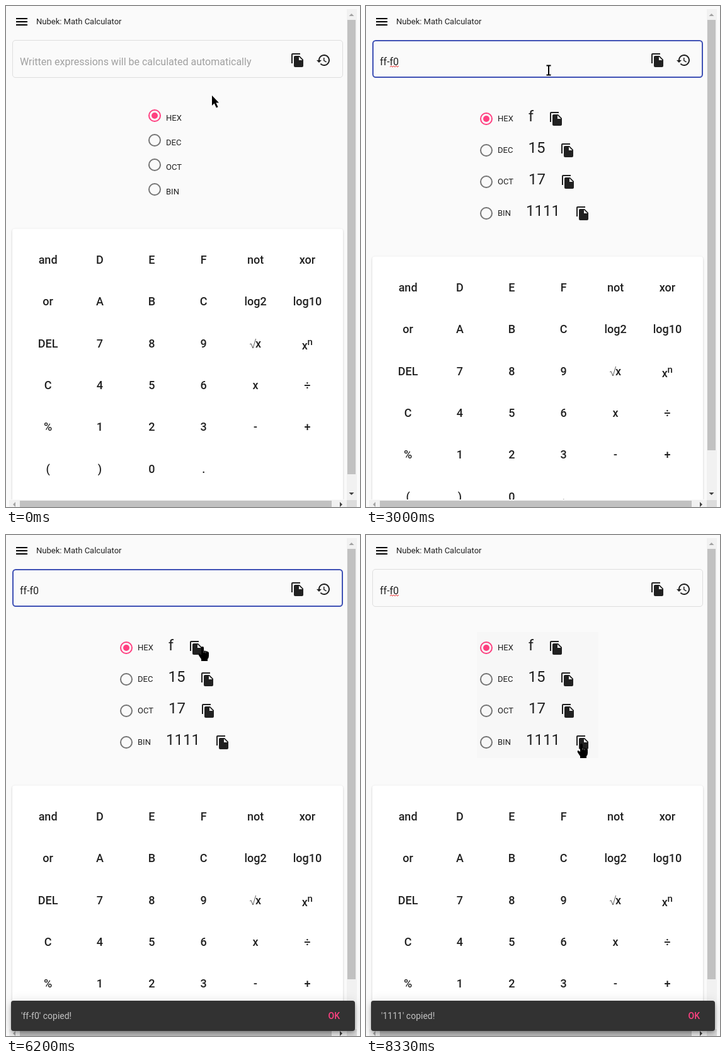
An HTML page for the animation above (9.14 s loop, 562 px wide and 795 px high).

```html
<!DOCTYPE html>
<html lang="en">
<head>
<meta charset="utf-8">
<title>Math Calculator</title>
<style>
  html, body { margin: 0; width: 100%; height: 100%; overflow: hidden; background: #fafafa; }
  #stage { position: relative; width: 562px; height: 795px; overflow: hidden; font-family: Roboto, sans-serif; }
  svg { position: absolute; left: 0; top: 0; }
  text { fill: #212121; white-space: pre; }
  .label { font-size: 13px; }
  .value { font-size: 24px; }
  .input { font-size: 16px; }
  .key { font-size: 18px; font-weight: 500; text-anchor: middle; }
  .card { fill: #fff; filter: drop-shadow(0 1px 1.5px rgba(0,0,0,.2)); }
  .track { fill: #f1f1f1; }
  .thumb { fill: #c1c1c1; }
  #snack {
    position: absolute; left: 8px; top: 739px; width: 546px; height: 48px; box-sizing: border-box;
    padding: 0 24px 0 16px; display: flex; align-items: center; justify-content: space-between;
    border-radius: 4px; background: #323232; color: rgba(255,255,255,.7); font-size: 14px; line-height: 20px;
    box-shadow: 0 3px 5px -1px rgba(0,0,0,.2), 0 6px 10px rgba(0,0,0,.14), 0 1px 18px rgba(0,0,0,.12);
  }
  #snack b { font-weight: 500; color: #ff4081; }
</style>
</head>
<body>
<div id="stage">
  <svg width="562" height="795">
    <defs>
      <path id="copy" fill="#212121" d="M16 1H4c-1.1 0-2 .9-2 2v14h2V3h12V1zm-1 4l6 6v10c0 1.1-.9 2-2 2H7.99C6.89 23 6 22.1 6 21l.01-14c0-1.1.89-2 1.99-2h7zm-1 7h5.5L14 6.5V12z"/>
      <clipPath id="page"><rect width="541" height="783"/></clipPath>
      <clipPath id="choices"><rect x="176" y="154" width="193" height="200"/></clipPath>
    </defs>

    <path d="M16 19h18v2H16zM16 24h18v2H16zM16 29h18v2H16z"/>
    <text class="label" x="48" y="29">Nubek: Math Calculator</text>

    <rect id="field" fill="none"/>
    <text id="hint" class="input" x="22" y="94" style="fill:#a0a0a0">Written expressions will be calculated automatically</text>
    <text id="typed" class="input" x="22" y="94"></text>
    <path id="squiggle" fill="none" stroke="#e33" d="M38 97l2-2 2 2 2-2 2 2 2-2 2 2 2-2"/>
    <rect id="caret" y="79" width="1" height="19" fill="#3f51b5"/>
    <circle id="hover" cx="462.5" cy="86" r="20" opacity=".06"/>
    <use href="#copy" x="451" y="74"/>
    <path transform="translate(492 74)" fill="#212121" d="M13 3c-4.97 0-9 4.03-9 9H1l3.89 3.89.07.14L9 12H6c0-3.87 3.13-7 7-7s7 3.13 7 7-3.13 7-7 7c-1.93 0-3.68-.79-4.94-2.06l-1.42 1.42C8.27 19.99 10.51 21 13 21c4.97 0 9-4.03 9-9s-4.03-9-9-9zm-1 5v5l4.28 2.54.72-1.21-3.5-2.08V8H12z"/>

    <g id="results"></g>
    <circle id="radioGlow" cx="191" cy="329" r="16" fill="#ff4081"/>
    <g clip-path="url(#choices)"><circle id="ripple" cx="343" cy="333"/></g>

    <g clip-path="url(#page)"><g id="keypad"><rect class="card" x="10" y="353.5" width="525" height="450" rx="4"/></g></g>

    <rect class="track" x="541" y="5" width="16" height="779"/>
    <rect class="track" x="5" y="784" width="536" height="11"/>
    <rect x="541" y="784" width="16" height="11" fill="#dcdcdc"/>
    <rect id="thumb" class="thumb" x="542" y="22" width="13"/>
    <rect class="thumb" x="22" y="785" width="495" height="10"/>
    <path fill="#a3a3a3" d="M544.5 16h8l-4-4zM15 787v8l-4-4z"/>
    <path fill="#404040" d="M544.5 772h8l-4 4zM530 787v8l4-4z"/>
  </svg>

  <div id="snack"><span id="message"></span><b>OK</b></div>

  <svg width="562" height="795">
    <g id="pointer">
      <path id="arrow" d="M0 0V16l3.7-3.5 3.2 7 2.7-1.2-3.2-6.8H11z"/>
      <path id="beam" fill="none" stroke="#000" stroke-width="2" d="M-3.5-7.5H3.5M0-8V8M-3.5 7.5H3.5"/>
      <g id="hand">
        <path d="M-2 2Q-2 0 0 0T2 2V7q2-1 3 .5q2-.8 3 .7q2-.3 2 2V15q0 3-2 5V23H-2V20L-6 14q-1-3 1-3l3 2z"/>
        <path stroke="#fff" stroke-width=".8" opacity=".6" d="M2.2 7v3M5 8v2.5"/>
      </g>
    </g>
  </svg>
</div>

<script>
const LOOP = 9140, STEP = 1000 / 15;
const $ = id => document.getElementById(id);
const NS = 'http://www.w3.org/2000/svg';

function add(parent, tag, attrs, text) {
  const el = document.createElementNS(NS, tag);
  set(el, attrs);
  if (text) el.textContent = text;
  parent.append(el);
  return el;
}
function set(el, attrs) {
  for (const name in attrs) el.setAttribute(name, attrs[name]);
}
const show = (el, on) => { el.style.visibility = on ? 'visible' : 'hidden'; };
const clamp = v => Math.max(0, Math.min(1, v));
const between = (s, a, b) => s >= a && s < b;

// Number base choices, with or without converted values
function choiceGroup(cx, top, gap, values) {
  const group = add($('results'), 'g', {});
  ['HEX', 'DEC', 'OCT', 'BIN'].forEach((name, i) => {
    const y = top + i * gap;
    add(group, 'circle', { cx, cy: y, r: 9, fill: 'none', 'stroke-width': 2, stroke: i ? '#757575' : '#ff4081' });
    if (!i) add(group, 'circle', { cx, cy: y, r: 5, fill: '#ff4081' });
    const label = add(group, 'text', { class: 'label', x: cx + 18, y: y + (values ? 4 : 8) }, name);
    if (!values) return;
    const x = cx + 42 + label.getComputedTextLength();
    const value = add(group, 'text', { class: 'value', x, y: y + 4 }, values[i]);
    add(group, 'use', { href: '#copy', x: Math.round(x + 24 + value.getComputedTextLength()), y: y - 12 });
  });
  return group;
}
const groups = [
  choiceGroup(236, 174, 39),
  choiceGroup(164, 179, 50, ['ff', '255', '377', '11111111']),
  choiceGroup(191, 179, 50, ['f', '15', '17', '1111'])
];

const keyRows = ['and D E F not xor', 'or A B C log2 log10', 'DEL 7 8 9 √ pow', 'C 4 5 6 x ÷', '% 1 2 3 - +', '( ) 0 .'];
keyRows.forEach((row, r) => row.split(' ').forEach((key, c) => {
  const x = 66.6 + c * 82.36, y = Math.round(409 + r * 66.3);
  const put = (text, dx = 0, dy = 0, size = 18) =>
    add($('keypad'), 'text', { class: 'key', x: x + dx, y: y + dy, style: `font-size:${size}px` }, text);
  if (key === '√') {
    add($('keypad'), 'path', {
      d: `M${x - 9} ${y - 5}l2-1.2 3 7.2 4.6-15`, fill: 'none', stroke: '#444', 'stroke-width': 0.9
    });
    put('x', 4.6);
  } else if (key === 'pow') {
    put('x', -4, 3);
    put('n', 4.3, -4, 15);
  } else put(key);
}));

const typing = [[0, ''], [13, 'f'], [15, 'ff'], [26, 'ff-'], [30, 'ff-f'], [32, 'ff-f0']];
const route = [
  [0, 327, 142], [6, 291, 95], [44, 291, 95], [53, 262, 303], [55, 262, 303], [59, 179, 135],
  [64, 215, 250], [69, 277, 164], [72, 483, 90], [77, 483, 90], [80, 462, 90], [81, 462, 90],
  [83, 462, 95], [86, 462, 95], [93, 312, 177], [102, 312, 177], [112, 342, 331], [999, 342, 331]
];

function pointerAt(s) {
  const i = route.findIndex(p => p[0] > s);
  const [s0, x0, y0] = route[i - 1], [s1, x1, y1] = route[i];
  const k = (s - s0) / (s1 - s0), e = k * k * (3 - 2 * k);
  return [x0 + (x1 - x0) * e, y0 + (y1 - y0) * e];
}

// The caret blinks every half second, restarting on input and focus
function caretOn(s) {
  if (s < 6 || between(s, 83, 86) || s >= 115) return false;
  const start = s < 13 ? 6 : s < 15 ? 13 : s < 26 ? 15 : s < 34 ? 26 : s < 86 ? 33.2 : 84;
  return s < 34 && s >= 26 || Math.floor((s - start) / 7.5) % 2 === 0;
}

function drawField(s, inField) {
  const focused = between(s, 6, 83) || between(s, 86, 115);
  const w = focused || inField ? 2 : 1;
  set($('field'), {
    x: 10 + w / 2, y: 54 + w / 2, width: 525 - w, height: 60 - w, rx: 4.5, 'stroke-width': w,
    stroke: focused ? '#3f51b5' : inField ? '#212121' : '#dedede'
  });
  const text = typing.filter(k => k[0] <= s).pop()[1];
  $('typed').textContent = text;
  show($('hint'), !text);
  show($('squiggle'), between(s, 45, 86) || s >= 99);
  show($('caret'), caretOn(s));
  set($('caret'), { x: Math.round(22 + (text ? $('typed').getComputedTextLength() : 0)) });
}

function drawPointer(x, y, inField) {
  const inChoices = x > 176 && x < 369 && y > 154 && y < 354;
  const kind = inChoices || inField && x > 440 ? 'hand' : inField ? 'beam' : 'arrow';
  for (const id of ['arrow', 'beam', 'hand']) show($(id), id === kind);
  set($('pointer'), { transform: `translate(${Math.round(x)} ${Math.round(y)})` });
  show($('hover'), inField && kind === 'hand');
}

function drawRipple(s) {
  const k = clamp((s - 114.6) / 5.5);
  const fade = clamp((s - 118) / 7);
  set($('ripple'), { r: 250 * (1 - (1 - k) ** 1.75), opacity: s < 115 ? 0 : 0.1 - 0.09 * fade });
  set($('radioGlow'), { opacity: s < 115 ? 0 : 0.15 * (1 - fade) });
}

function drawSnack(s) {
  const second = s >= 118;
  const enter = clamp((s - (second ? 117 : 84)) / 3);
  const leave = s === 116 ? 0.75 : s === 117 ? 0 : 1;
  $('message').textContent = second ? "'1111' copied!" : "'ff-f0' copied!";
  $('snack').style.opacity = enter * leave || (between(s, 85, 117) ? enter : 0);
  $('snack').style.transform = `scale(${0.8 + 0.2 * enter})`;
}

function draw(now) {
  const s = Math.floor((now % LOOP + 3.5) / STEP);
  const [x, y] = pointerAt(s);
  const inField = y < 114;
  const stage = s < 20 ? 0 : s < 37 ? 1 : 2;
  groups.forEach((g, i) => show(g, i === stage));
  set($('keypad'), { transform: `translate(0 ${stage ? 44 : 0})` });
  set($('thumb'), { height: stage ? 683 : 721 });
  drawField(s, inField);
  drawPointer(x, y, inField);
  drawRipple(s);
  drawSnack(s);
}

const begin = performance.now();
function tick() {
  draw(performance.now() - begin);
  requestAnimationFrame(tick);
}
tick();
</script>
</body>
</html>
```
